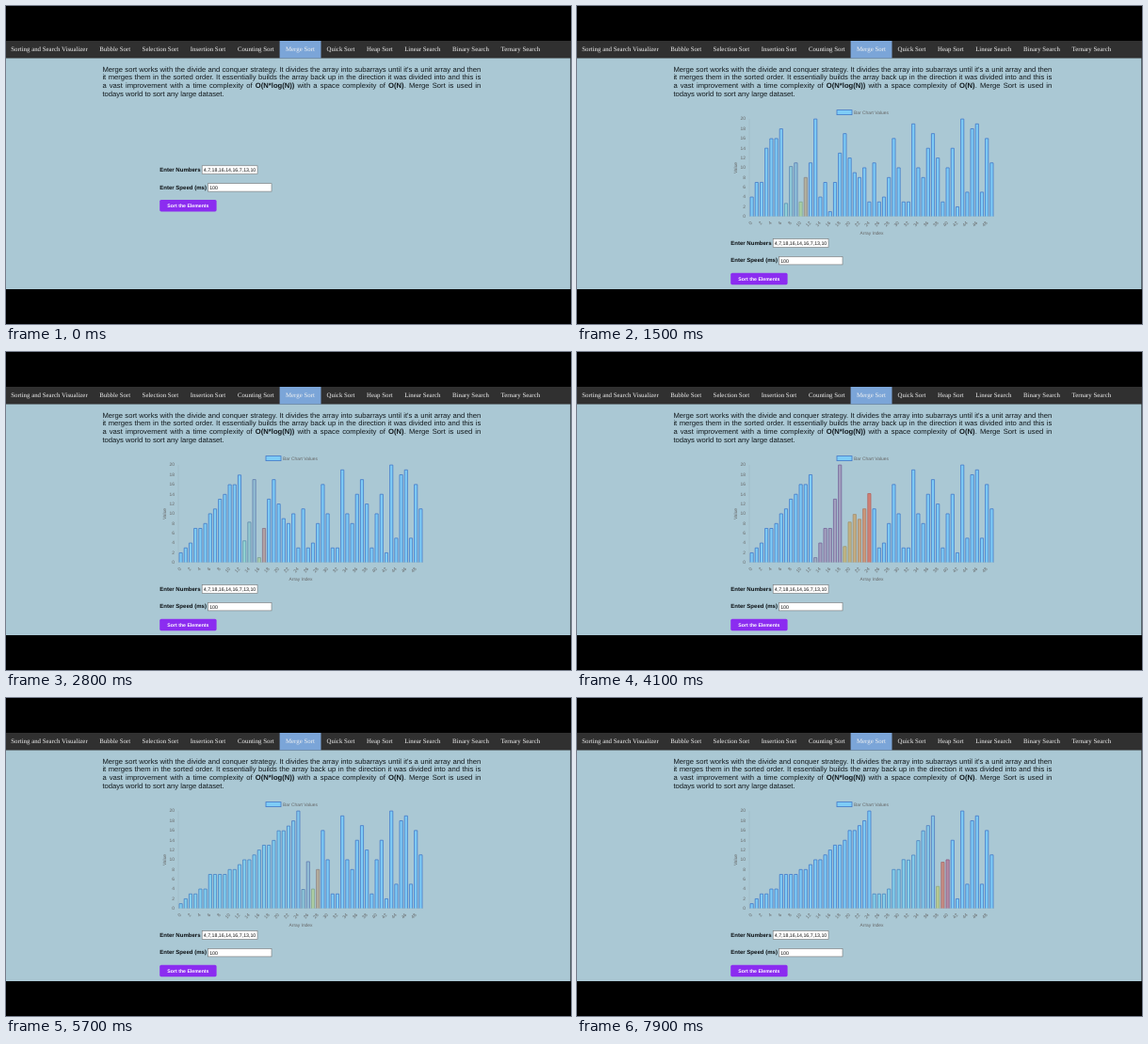
Recreate the animation shown at these times as an HTML page. Size 600 by 338 pixels, loop 8000 ms.

```html
<!DOCTYPE html>
<html lang="en">
<head>
<meta charset="utf-8">
<title>Merge Sort</title>
<style>
  html, body { margin: 0; width: 100%; height: 100%; overflow: hidden; background: #000; }
  #stage { position: relative; width: 600px; height: 338px; overflow: hidden; }
  svg { position: absolute; left: 0; top: 0; }
  text { font-family: Arial, "Liberation Sans", sans-serif; text-rendering: geometricPrecision; }
  .nav { font: 6.85px "Times New Roman", "Liberation Serif", serif; fill: #f2f2f2; }
  .axis text { font-size: 4.9px; fill: #666; }
  .label { font-size: 6.05px; font-weight: bold; fill: #0b0f12; }
  .value { font-size: 5.25px; fill: #111; }
  .field { fill: #fff; stroke: #767676; stroke-width: .6; }
  .button { font-size: 5.2px; font-weight: bold; fill: #fff; text-anchor: middle; }
  .end { text-anchor: end; }
  .mid { text-anchor: middle; }
  #intro { position: absolute; left: 102.4px; top: 63.6px; width: 401.9px; color: #11181c;
    font: 7.65px/8.85px Arial, "Liberation Sans", sans-serif; text-rendering: geometricPrecision; }
  #intro div { white-space: nowrap; text-align-last: justify; }
  #intro div:last-child { text-align-last: left; }
</style>
</head>
<body>
<div id="stage">
  <svg width="600" height="338" viewBox="0 0 600 338">
    <rect y="37" width="599.5" height="264" fill="#aac8d4"/>
    <rect y="37" width="600" height="18.5" fill="#303030"/>
    <rect x="290.6" y="37" width="43.9" height="18.5" fill="#7ba5d8"/>
    <g id="nav"></g>
    <g id="chart">
      <g id="axis" class="axis">
        <path d="M183 119.8V223.5H443" fill="none" stroke="#000" stroke-opacity=".1" stroke-width=".5"/>
        <text x="294" y="114.8">Bar Chart Values</text>
        <text class="mid" x="313" y="243">Array Index</text>
        <text class="mid" transform="translate(169.6 172) rotate(-90)">Value</text>
      </g>
      <rect id="legend" x="276" y="110.6" width="16" height="5" stroke-width=".8"/>
      <g id="bars" stroke-width=".8"></g>
    </g>
    <g id="form">
      <text class="label" x="163.2" y="176.2">Enter Numbers</text>
      <rect class="field" x="208.2" y="169.8" width="58.8" height="8.8"/>
      <text class="value" x="209.8" y="176.2">4,7,18,16,14,16,7,13,10</text>
      <text class="label" x="163.2" y="194.7">Enter Speed (ms)</text>
      <rect class="field" x="214.5" y="188.7" width="67.5" height="8.4"/>
      <text class="value" x="216.2" y="194.8">100</text>
      <rect x="163.2" y="206" width="60.4" height="12.4" rx="1.6" fill="#8b2cf0"/>
      <text class="button" x="193.4" y="214">Sort the Elements</text>
    </g>
  </svg>
  <div id="intro">
    <div>Merge sort works with the divide and conquer strategy. It divides the array into subarrays until it's a unit array and then</div>
    <div>it merges them in the sorted order. It essentially builds the array back up in the direction it was divided into and this is</div>
    <div>a vast improvement with a time complexity of <b>O(N*log(N))</b> with a space complexity of <b>O(N)</b>. Merge Sort is used in</div>
    <div>todays world to sort any large dataset.</div>
  </div>
</div>
<script>
const LOOP = 8000, FRAME = 100, START = 100;
const DATA = [4,7,18,16,14,16,7,13,10,2,3,8,11,20,4,7,1,7,13,17,12,9,8,10,3,
  11,3,4,8,16,10,3,3,19,10,8,14,17,12,3,10,14,2,20,5,18,19,5,16,11];
const LEFT = 183, BASE = 223.5, UNIT = 5.185, SLOT = 5.2, BAR = 3.6;

// Fill rgb followed by edge rgb
const BLUE = [126,204,246, 66,120,200];
const RED = [217,98,110, 190,66,84];
const GREEN = [180,245,142, 140,222,130];

// Sort progress: time in ms, steps done
const PACE = [[START, 0], [1500, 36.05], [2800, 70.5], [4100, 104.25],
  [4900, 126.45], [6700, 175.3], [7900, 208.2]];

const $ = id => document.getElementById(id);
function add(parent, tag, attrs, text) {
  const el = document.createElementNS('http://www.w3.org/2000/svg', tag);
  for (const k in attrs) el.setAttribute(k, attrs[k]);
  if (text !== undefined) el.textContent = text;
  return parent.appendChild(el);
}
const center = i => LEFT + SLOT * (i + .5);

[['Sorting and Search Visualizer', 5.3], ['Bubble Sort', 99.2], ['Selection Sort', 144.6],
 ['Insertion Sort', 195.8], ['Counting Sort', 246], ['Merge Sort', 297], ['Quick Sort', 340.6],
 ['Heap Sort', 383], ['Linear Search', 423.2], ['Binary Search', 474], ['Ternary Search', 525.6]]
  .forEach(([name, x]) => add($('nav'), 'text', { class: 'nav', x, y: 48.1 }, name));

for (let v = 0; v <= 20; v += 2)
  add($('axis'), 'text', { class: 'end', x: 179, y: BASE - v * UNIT + 1.6 }, v);
for (let i = 0; i < 50; i += 2)
  add($('axis'), 'text', { class: 'end', y: 1.7,
    transform: `translate(${center(i) - .5} 229.5) rotate(-48)` }, i);
const bars = DATA.map(() => add($('bars'), 'path', {}));

// Each step either marks a range to merge or writes one value
const steps = [];
function sort(a, lo, hi) {
  if (lo >= hi) return;
  const mid = (lo + hi) >> 1;
  sort(a, lo, mid);
  sort(a, mid + 1, hi);
  steps.push({ lo, hi });
  const merged = a.slice(lo, hi + 1).sort((p, q) => p - q);
  merged.forEach((value, k) => {
    a[lo + k] = value;
    steps.push({ at: lo + k, value });
  });
}
sort(DATA.slice(), 0, DATA.length - 1);

function progress(t) {
  let i = 1;
  while (i < PACE.length - 1 && t > PACE[i][0]) i++;
  const [t0, s0] = PACE[i - 1], [t1, s1] = PACE[i];
  return s0 + (s1 - s0) * (t - t0) / (t1 - t0);
}

// Every step restarts a quartic ease-out that is ten steps long
function stateAt(s) {
  const list = DATA.map(v => ({ v: 0, to: v, rgb: BLUE.slice(), tint: BLUE }));
  for (let n = 0; n <= s && n < steps.length; n++) {
    const { lo, hi, at, value } = steps[n];
    if (at === undefined) {
      list.forEach((b, i) => b.tint = i >= lo && i <= hi ? RED : BLUE);
    } else {
      list[at].to = value;
      list[at].tint = GREEN;
    }
    const gain = 1 - (1 - .1 * Math.min(1, s - n)) ** 4;
    for (const b of list) {
      b.v += (b.to - b.v) * gain;
      b.rgb = b.rgb.map((c, k) => c + (b.tint[k] - c) * gain);
    }
  }
  return list;
}

function paint(el, c) {
  el.setAttribute('fill', `rgb(${c.slice(0, 3).map(Math.round)})`);
  el.setAttribute('stroke', `rgb(${c.slice(3).map(Math.round)})`);
}

function draw(t) {
  const open = t >= START;
  $('chart').style.display = open ? '' : 'none';
  $('form').setAttribute('transform', `translate(0 ${open ? 77.8 : 0})`);
  if (!open) return;
  const list = stateAt(progress(t));
  list.forEach((b, i) => {
    const x = center(i) - BAR / 2 + .2, w = BAR - .4;
    const top = Math.min(BASE, BASE - b.v * UNIT + .3);
    bars[i].setAttribute('d', `M${x} ${BASE}V${top}h${w}V${BASE}`);
    paint(bars[i], b.rgb);
  });
  paint($('legend'), list[0].tint);
}

const origin = performance.now();
let shown = -1;
function tick() {
  const t = Math.floor((performance.now() - origin) % LOOP / FRAME) * FRAME;
  if (t !== shown) draw(shown = t);
  requestAnimationFrame(tick);
}
tick();
</script>
</body>
</html>
```
